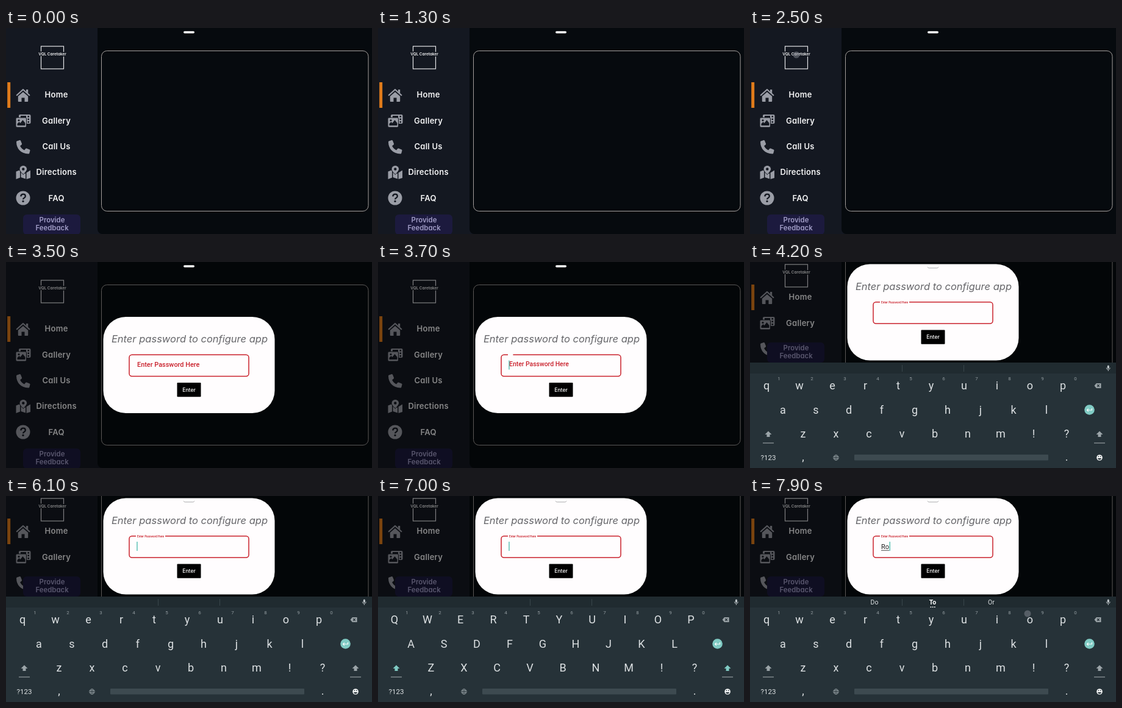
An HTML page that plays this animation: 600x338 px, repeating every 8000 ms.

```html
<!DOCTYPE html>
<html lang="en">
<head>
<meta charset="utf-8">
<title>Kiosk password prompt</title>
<style>
  html, body { margin: 0; width: 100%; height: 100%; overflow: hidden; background: #060a0e; }
  svg { display: block; width: 100vw; height: 100vh; }
  text { font-family: Inter, "Open Sans", sans-serif; font-feature-settings: "cv11"; text-anchor: middle; }
  .nav text { font-size: 13px; font-weight: 600; letter-spacing: .25px; fill: #f4f4f5; }
  .icon { fill: #9a9da6; }
  .cut { fill: #141821; }
  .keys text, .field text { font-family: Roboto, "Noto Sans", sans-serif; }
  .keys text { fill: #dde1e3; font-size: 18px; }
  .keys .digit { font-size: 8px; fill: #929b9f; }
  .keys .small { font-size: 11.5px; }
  .keys .hint { font-size: 10.5px; }
  .field text { text-anchor: start; }
</style>
</head>
<body>
<svg viewBox="0 0 600 338" preserveAspectRatio="none">
  <rect width="600" height="338" fill="#141821"/>
  <rect x="150" y="-10" width="470" height="348" rx="8" fill="#060a0e"/>
  <rect id="card" x="156.5" y="37.5" width="437.5" height="263" rx="9" fill="none" stroke="#a5a09d"/>

  <g id="brand">
    <rect x="57.5" y="30" width="37" height="37" fill="none" stroke="#e6e7ea" stroke-width="1.2"/>
    <text x="76" y="45" font-size="6.4" font-weight="600" fill="#f4f4f5" stroke="#141821" stroke-width="3" paint-order="stroke">VQL Caretaker</text>
  </g>

  <g id="nav" class="nav">
    <rect x="2.2" y="89" width="5" height="42" fill="#e07b1a"/>
    <g class="icon">
      <path d="M28 105 36.2 112v8q0 1-1 1H30.500v-6.500h-5V121H20.800q-1 0-1-1v-8z"/>
      <path d="M17.800 110.200 28 101l10.300 9.200" fill="none" stroke="#9a9da6" stroke-width="2.2" stroke-linecap="round" stroke-linejoin="round"/>
      <path d="M33 101h3.200v6.500L33 104.500z"/>

      <rect x="21" y="142" width="19.5" height="15" rx="2"/>
      <path class="cut" d="M35.5 144H38v2.500h-2.500zM35.5 148.500H38v2.500h-2.500zM35.5 153H38v2.500h-2.500zM24 144h9v3h-9z"/>
      <rect x="16" y="147" width="17.5" height="16" rx="2" stroke="#141821"/>
      <path class="cut" d="M18.5 160v-3l3-3 2 2 4-5 4 5v4z"/>
      <circle class="cut" cx="21" cy="151.500" r="1.6"/>

      <path d="M18 185.500 22.500 184q1-.2 1.500.8l2 5q.3 1-.4 1.600l-2.500 2q2.500 5 7 7l2-2.500q.7-.7 1.600-.4l5 2q1 .5.8 1.500l-1.200 4.500q-.3 1-1.400 1Q27 206 22 200.500 17 195 17 187q0-1.200 1-1.500z"/>

      <path d="M16.500 235.500 23 233v12.500l-6.500 2.500zM24.500 236l7.500 3v8.500l-7.500-2.500zM33.500 237.500l6.500-4v12.500l-6.500 2z"/>
      <path d="M28.300 240.500q-6.300-6-6.300-9a6.300 6 0 0 1 12.600 0q0 3-6.300 9z" stroke="#141821"/>
      <circle class="cut" cx="28.300" cy="231.500" r="2.2"/>

      <circle cx="28" cy="279" r="11.5"/>
    </g>
    <path d="M24.300 276.300q.3-3.600 3.900-3.600t3.600 3.200q0 2-2.200 3-1.500.8-1.500 2.300" fill="none" stroke="#141821" stroke-width="2.300"/>
    <circle class="cut" cx="28" cy="284.300" r="1.6"/>
  </g>

  <g id="feedback">
    <rect x="28" y="306" width="94" height="33" rx="6" fill="#1c1a3e"/>
    <g font-size="11.4" font-weight="600" fill="#a09cc6">
      <text x="75.5" y="319.300">Provide</text><text x="75.5" y="332.300">Feedback</text>
    </g>
  </g>

  <rect id="dim" width="600" height="338" fill="#000"/>
  <rect id="under" y="165" width="600" height="173" fill="#5d5f60"/>

  <g id="board" class="keys">
    <rect y="165" width="600" height="174" fill="#263238"/>
    <rect y="165" width="600" height="18" fill="#202b30"/>
    <path d="M249.500 169v11M350.500 169v11" stroke="#3a464c"/>
    <g id="hints">
      <text class="hint" x="204" y="178">Do</text>
      <text class="hint" x="299.5" y="178" style="font-weight:700;fill:#fff">To</text>
      <text class="hint" x="395.5" y="178">Or</text>
      <path d="M295.500 182.300h8.500" stroke="#fff" stroke-width="1.6" stroke-dasharray="1.8 1.4"/>
    </g>
    <g fill="#c3cacd">
      <rect x="585.800" y="169.500" width="3" height="5.5" rx="1.5"/>
      <path d="M584.300 173.500q0 3 3 3t3-3M587.300 176.500v2.500" fill="none" stroke="#c3cacd" stroke-width=".9"/>
    </g>
    <g id="letters"></g>
    <path d="M564.500 203l3.300-4h7.700v8h-7.700z" fill="#9ba4a8"/>
    <path d="M569 201l3.800 4m0-4-3.800 4" stroke="#263238" stroke-width="1.1"/>
    <circle cx="556.5" cy="242.500" r="8.300" fill="#80cbc4"/>
    <path d="M560.500 240v3h-8m2.300-2.300-2.300 2.300 2.300 2.300" fill="none" stroke="#fff" stroke-width="1.1"/>
    <path id="shifts" d="M30 277.500l5.500 5.500h-3v4h-5v-4h-3zM573 277.500l5.500 5.500h-3v4h-5v-4h-3z"/>
    <path d="M21 297h18M564 297h18" stroke="#aab2b5"/>
    <text class="small" x="30" y="325">?123</text>
    <text x="87" y="326">,</text><text x="519" y="326">.</text>
    <g fill="none" stroke="#98a2a6" stroke-width=".8">
      <circle cx="141" cy="321" r="4.2"/><ellipse cx="141" cy="321" rx="1.9" ry="4.2"/>
      <path d="M137 319.500h8M137 322.500h8"/>
    </g>
    <rect x="171" y="316" width="318" height="9.5" rx="1" fill="#3d4a50"/>
    <circle cx="573" cy="321" r="4.8" fill="#f2f4f4"/>
    <path d="M570 322h6q-.5 2.500-3 2.500t-3-2.500zM570.700 318.500h1.400v1.400h-1.400zM574 318.500h1.400v1.400h-1.400z" fill="#263238"/>
  </g>

  <g id="dialog">
    <rect x="159.5" y="90" width="281" height="158" rx="37" fill="#fffdfe"/>
    <text x="301" y="132" font-size="16.5" font-style="italic" fill="#66666a">Enter password to configure app</text>
    <g class="field">
      <rect x="202" y="152.300" width="196" height="35.300" rx="4.5" fill="none" stroke="#c9202b" stroke-width="1.5"/>
      <rect id="gap" x="213" y="151" height="2.7" fill="#fffdfe"/>
      <text id="label" fill="#c9202b" font-weight="500">Enter Password Here</text>
      <text id="typed" x="215" y="173.500" font-size="11" fill="#222"></text>
      <path id="mark" stroke="#222" stroke-width=".8"/>
      <rect id="caret" y="161.500" width="1.3" height="15" fill="#45b8aa"/>
    </g>
    <rect x="280.5" y="198" width="39" height="23.300" rx="1" fill="#000"/>
    <text x="300" y="212.800" font-size="8.600" font-weight="500" fill="#fff">Enter</text>
  </g>

  <rect x="291" y="5.200" width="18" height="3.600" rx="1.8" fill="#fff"/>
  <path id="edge" d="M291 8.200q.8 1.700 2.500 1.700h13q1.700 0 2.500-1.700" fill="none" stroke="#a9a9ab"/>
  <circle id="touch" r="5.5" fill="#858993" fill-opacity=".5"/>
</svg>
<script>
  const LOOP = 8000;
  const $ = id => document.getElementById(id);
  const clamp = v => Math.min(1, Math.max(0, v));
  const part = (t, from, to) => clamp((t - from) / (to - from));
  const easeOut = p => 1 - (1 - p) ** 3;
  const easeBoth = p => p * p * (3 - 2 * p);
  const mix = (a, b, p) => a + (b - a) * p;
  const show = (id, on) => { $(id).style.display = on ? "" : "none"; };
  const set = (id, attrs) => { for (const k in attrs) $(id).setAttribute(k, attrs[k]); };
  const shiftY = (id, y) => set(id, { transform: `translate(0 ${y})` });

  function addText(parent, x, y, text, cls) {
    const el = document.createElementNS("http://www.w3.org/2000/svg", "text");
    el.setAttribute("x", x);
    el.setAttribute("y", y);
    if (cls) el.setAttribute("class", cls);
    el.textContent = text;
    $(parent).append(el);
  }

  ["Home", "Gallery", "Call Us", "Directions", "FAQ"].forEach((name, i) =>
    addText("nav", 82.6, 114.3 + i * 42.3, name));

  [["qwertyuiop", 27, 209], ["asdfghjkl", 54, 248.5], ["zxcvbnm!?", 87, 288]].forEach(([row, x, y]) =>
    [...row].forEach((ch, i) => addText("letters", x + i * 54, y, ch)));
  [..."1234567890"].forEach((ch, i) => addText("letters", 47.5 + i * 54, 193.5, ch, "digit"));

  // start, end, x, y
  const TOUCHES = [
    [1000, 1180, 75, 51], [1380, 1560, 76, 47], [1740, 1920, 75, 45],
    [2080, 2260, 76, 45], [2420, 2600, 76, 44], [2760, 2920, 76, 45],
    [6600, 6740, 30, 284], [7260, 7400, 188, 203], [7800, 7960, 455, 193]
  ];
  const KEYBOARD = 3900, SHIFT = 6680, FIRST = 7320, SECOND = 7840;

  function draw(t) {
    const open = easeOut(part(t, 2950, 3200));
    const raise = part(t, KEYBOARD, KEYBOARD + 250);
    const slide = easeOut(raise);
    const compact = t >= KEYBOARD;

    shiftY("card", compact ? -52 : 0);
    shiftY("nav", compact ? -52 : 0);
    shiftY("brand", compact ? -26 : 0);
    shiftY("feedback", compact ? -174 : 0);

    set("dim", { opacity: open * 0.45 });
    show("under", compact);
    show("board", compact);
    set("board", { opacity: clamp(raise * 1.25) });
    shiftY("board", 158 * (1 - slide));

    const scale = mix(0.9, 1, open);
    set("dialog", {
      opacity: open,
      transform: `translate(300 ${169 - 86.5 * slide}) scale(${scale}) translate(-300 -169)`
    });
    show("edge", raise === 1);

    const float = easeBoth(part(t, 3670, 3850));
    set("gap", { width: t < 3670 ? 0 : mix(5, 48, float) });
    set("label", { x: 215, y: mix(172.3, 154, float), "font-size": mix(10.9, 4.7, float) });

    const typed = t >= SECOND ? "Ro" : t >= FIRST ? "R" : "";
    const end = 215 + [0, 7, 13.2][typed.length];
    if ($("typed").textContent !== typed) $("typed").textContent = typed;
    set("mark", { d: `M215 175.8H${end}` });
    show("mark", typed);
    set("caret", { x: typed ? end + 0.4 : 214.3 });
    const blink = t >= 4700 && (t - 4700) % 1000 < 500;
    show("caret", typed || blink || (t >= 3600 && t < KEYBOARD));

    const upper = t >= SHIFT && t < FIRST;
    $("letters").style.textTransform = upper ? "uppercase" : "none";
    set("shifts", { fill: upper ? "#80cbc4" : "#9ba4a8" });
    show("hints", t >= SECOND);

    const hit = TOUCHES.find(([from, to]) => t >= from && t < to);
    show("touch", hit);
    if (hit) set("touch", { cx: hit[2], cy: hit[3] });
  }

  function tick() {
    draw(performance.now() % LOOP);
    requestAnimationFrame(tick);
  }
  draw(0);
  requestAnimationFrame(tick);
</script>
</body>
</html>
```
